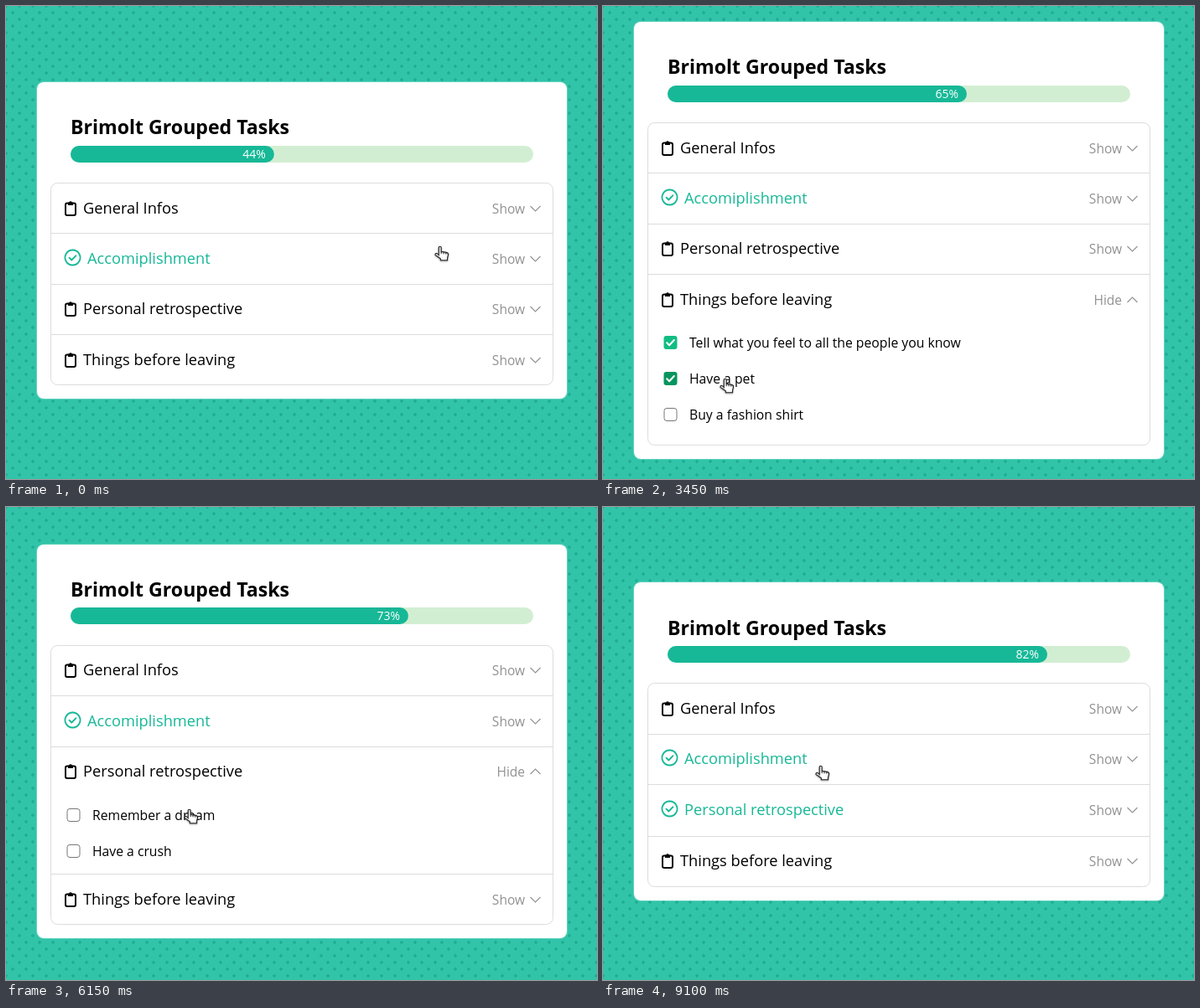
An HTML page with a canvas that plays this animation: 705x565 px, repeating every 9450 ms.

```html
<!DOCTYPE html>
<html lang="en">
<head>
<meta charset="utf-8">
<title>Grouped Tasks</title>
<style>
  html, body { margin: 0; width: 100%; height: 100%; overflow: hidden; }
  canvas {
    display: block;
    background:
      radial-gradient(circle, #20ae93 1.5px, transparent 2.1px) 0 0 / 16px 16px,
      radial-gradient(circle, #20ae93 1.5px, transparent 2.1px) 8px 8px / 16px 16px,
      #31c4a9;
  }
</style>
</head>
<body>
<canvas id="stage" width="705" height="565"></canvas>
<script>
const ctx = document.getElementById('stage').getContext('2d');
const LOOP = 9450, EASE_MS = 500;
const ROW = 60.4, ITEM = 42.8, CENTER = 280, CLOSED_HEIGHT = 378;
const GREEN = '#17b897', GRAY = '#929292', LINE = '#dcdcdc';
const FONT = '"Open Sans", "Noto Sans", sans-serif';

const groups = [
  { title: 'General Infos', items: [] },
  { title: 'Accomiplishment', doneAt: 0, items: [] },
  { title: 'Personal retrospective', doneAt: 7490, openAt: 5775, closeAt: 8680, height: 96,
    items: [{ text: 'Remember a dream', checkAt: 6560 }, { text: 'Have a crush', checkAt: 7490 }] },
  { title: 'Things before leaving', openAt: 1449, closeAt: 4640, height: 144,
    items: [{ text: 'Tell what you feel to all the people you know', checkAt: 2430 },
            { text: 'Have a pet', checkAt: 3385 }, { text: 'Buy a fashion shirt' }] },
];

// [start time, percent gained]
const gains = [[2430, 19.2], [3385, 9.8], [6560, 6.2], [7490, 2.87]];

// [time, left, top] of the mouse cursor
const route = [
  [0, 511, 287], [50, 511, 287], [1000, 277, 397], [1100, 257, 424], [1550, 257, 424],
  [2250, 150, 397], [2500, 150, 397], [2900, 146, 437], [3200, 139, 445], [4100, 139, 445],
  [4450, 172, 344], [4640, 172, 344], [5150, 193, 303], [5450, 207, 343], [5600, 207, 343],
  [5650, 212, 361], [6580, 212, 361], [7150, 178, 407], [7490, 178, 407], [7700, 177, 386],
  [8100, 253, 309], [LOOP, 253, 309],
];

const clipboard = new Path2D('M4 3.5H3q-2 0-2 2V16q0 2 2 2h8q2 0 2-2V5.5q0-2-2-2h-1');
const clip = new Path2D('M4 2.5h1.2a1.9 1.9 0 0 1 3.6 0H10V6H4z');
const circleTick = new Path2D('M10.5 1a9 9 0 1 0 .01 0M6.5 10.2l2.8 2.8 5-5.2');
const boxTick = new Path2D('M3.7 8.3l2.9 2.9 5.7-6.2');
const hand = new Path2D('M5.2 11V1.8a1.5 1.5 0 0 1 3 0V6.3l6.3 1.1q2.4.5 2.1 2.8l-1 3.8v2.8H7.3v-2L1.2 10.6a1.4 1.4 0 0 1 1.9-2L5.2 10');
const knuckles = new Path2D('M8.2 6.3v2.4M11 7v1.9M13.8 7.5v1.7');
const arrow = new Path2D('M.8 1v14.4l3.3-3 2.2 5.2 2.5-1.1-2.2-5.1h4.3z');

// CSS "ease" timing curve
function ease(x) {
  if (x <= 0) return 0;
  if (x >= 1) return 1;
  let low = 0, high = 1, s;
  for (let i = 0; i < 24; i++) {
    s = (low + high) / 2;
    if (0.75 * s * (1 - s) + s ** 3 < x) low = s; else high = s;
  }
  return 0.3 * s * (1 - s) ** 2 + 3 * s * s * (1 - s) + s ** 3;
}
const eased = (t, start) => start === undefined ? 0 : ease((t - start) / EASE_MS);

function cursorAt(t) {
  const i = route.findIndex(point => point[0] > t);
  const [t0, x0, y0] = route[i - 1], [t1, x1, y1] = route[i];
  const u = (t - t0) / (t1 - t0), k = u * u * (3 - 2 * u);
  return { x: x0 + (x1 - x0) * k, y: y0 + (y1 - y0) * k };
}

function text(string, x, y, size, color, align = 'left', weight = 400) {
  ctx.font = `${weight} ${size}px ${FONT}`;
  ctx.textAlign = align;
  ctx.fillStyle = color;
  ctx.fillText(string, x, y);
}

function box(x, y, w, h, r, fill, stroke) {
  ctx.beginPath();
  ctx.roundRect(x, y, w, h, r);
  if (fill) { ctx.fillStyle = fill; ctx.fill(); }
  if (stroke) { ctx.strokeStyle = stroke; ctx.lineWidth = 1; ctx.stroke(); }
}

function shape(path, x, y, { fill, stroke, width = 1 }) {
  ctx.save();
  ctx.translate(x, y);
  ctx.lineWidth = width;
  ctx.lineJoin = ctx.lineCap = 'round';
  if (fill) { ctx.fillStyle = fill; ctx.fill(path); }
  if (stroke) { ctx.strokeStyle = stroke; ctx.stroke(path); }
  ctx.restore();
}

function line(...points) {
  ctx.beginPath();
  points.forEach(([x, y]) => ctx.lineTo(x, y));
  ctx.stroke();
}

function drawCard(top, height) {
  const y = Math.round(top), h = Math.round(top + height) - y;
  box(36.5, y - 0.5, 633, h + 1, 8.5, null, 'rgba(255,255,255,.25)');
  box(37, y, 632, h, 8, '#fff');
}

function drawHeader(t, top) {
  const percent = gains.reduce((sum, [start, gain]) => sum + gain * eased(t, start), 44);
  const width = 552 * percent / 100, barTop = Math.floor(top + 76);
  text('Brimolt Grouped Tasks', 77, Math.round(top + 62.4), 23.1, '#000', 'left', 700);
  box(77, barTop, 552, 20, 10, '#d2eed2');
  box(77, barTop, width, 20, 10, GREEN);
  text(Math.round(percent) + '%', 77 + width - 10, barTop + 15, 14, '#fff', 'right');
}

function drawTitle(t, group, y) {
  const base = Math.floor(y + 36.45);
  const open = t >= group.openAt && t < group.closeAt;
  if (t >= group.doneAt) {
    shape(circleTick, 69, base - 17.5, { stroke: GREEN, width: 1.9 });
    text(group.title, 97, base, 18.25, GREEN);
  } else {
    shape(clipboard, 70, base - 16, { stroke: '#000', width: 2 });
    shape(clip, 70, base - 16, { fill: '#000' });
    text(group.title, 92, base, 18.25, '#000');
  }
  text(open ? 'Hide' : 'Show', 619, base, 15.5, GRAY, 'right');
  const [edge, tip] = open ? [base - 3, base - 9] : [base - 9, base - 3];
  ctx.strokeStyle = GRAY;
  ctx.lineWidth = 1.1;
  line([625.5, edge], [631.5, tip], [637.5, edge]);
}

// Draws the visible part of a panel; returns true when the cursor lies between its items.
function drawPanel(t, group, y, height, cursor) {
  const tip = cursor.y + 2;
  let onItem = false;
  ctx.save();
  ctx.beginPath();
  ctx.rect(54, y + ROW, 598, height);
  ctx.clip();
  group.items.forEach((item, i) => {
    const base = Math.floor(y + 88.2 + i * ITEM), boxTop = base - 14;
    const hover = Math.abs(tip - (base - 6)) < 14;
    onItem ||= hover;
    if (t >= item.checkAt) {
      box(72.5, boxTop, 16, 16, 3, hover ? '#08945f' : '#10bd82');
      shape(boxTick, 72.5, boxTop, { stroke: '#fff', width: 2.1 });
    } else {
      box(73, boxTop + 0.5, 15, 15, 3, '#fff', '#777');
    }
    text(item.text, 103, base, 15.72, '#000');
  });
  ctx.restore();
  return tip > y + ROW && tip < y + ROW + height && !onItem;
}

function drawCursor(cursor, useArrow) {
  const x = Math.round(cursor.x), y = Math.round(cursor.y);
  ctx.shadowColor = 'rgba(0,0,0,.3)';
  ctx.shadowBlur = 2;
  ctx.shadowOffsetY = 1;
  if (useArrow) {
    shape(arrow, x, y, { fill: '#222', stroke: '#fff' });
  } else {
    shape(hand, x, y, { fill: '#fff', stroke: '#222', width: 1.1 });
  }
  ctx.shadowColor = 'transparent';
  if (!useArrow) shape(knuckles, x, y, { stroke: '#222', width: 0.9 });
}

function draw(t) {
  const cursor = cursorAt(t);
  const heights = groups.map(g => g.items.length ? g.height * (eased(t, g.openAt) - eased(t, g.closeAt)) : 0);
  const extra = heights.reduce((a, b) => a + b);
  const top = CENTER - (CLOSED_HEIGHT + extra) / 2;
  const listTop = top + 120.55, listEdge = Math.floor(listTop) + 0.5;
  const listBottom = Math.round(listTop + ROW * groups.length + extra) - 0.5;
  let y = listTop, useArrow = false;

  ctx.clearRect(0, 0, 705, 565);
  drawCard(top, CLOSED_HEIGHT + extra);
  drawHeader(t, top);
  box(53.5, listEdge, 599, listBottom - listEdge, 8, null, LINE);

  groups.forEach((group, i) => {
    if (i) {
      const ruleY = Math.floor(y) + 0.5;
      ctx.strokeStyle = LINE;
      ctx.lineWidth = 1;
      line([54, ruleY], [652, ruleY]);
    }
    drawTitle(t, group, y);
    if (heights[i] > 0.1 && drawPanel(t, group, y, heights[i], cursor)) useArrow = true;
    y += ROW + heights[i];
  });
  drawCursor(cursor, useArrow);
}

function tick() {
  draw(performance.now() % LOOP);
  requestAnimationFrame(tick);
}
tick();
</script>
</body>
</html>
```
